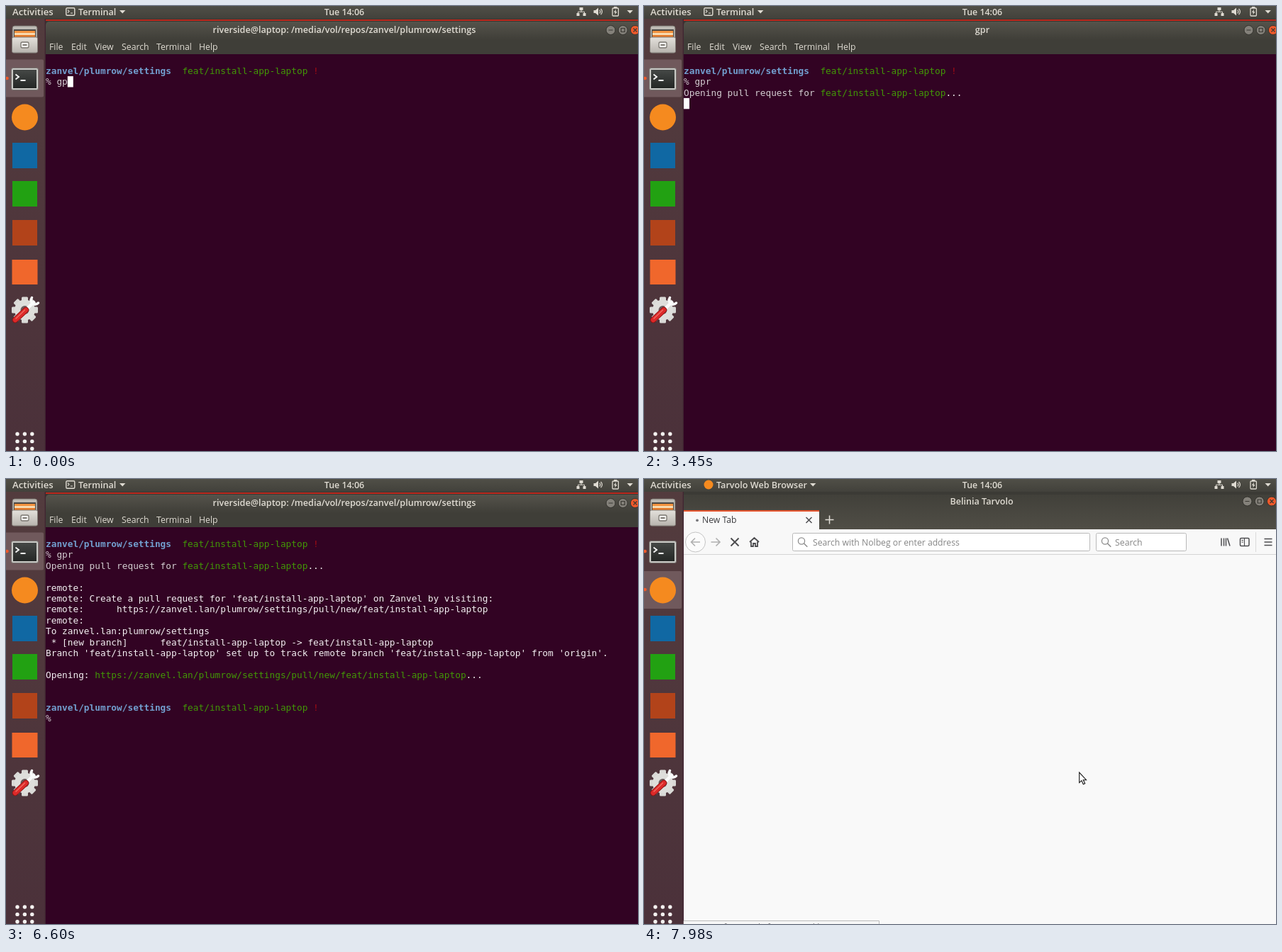
Recreate the animation shown at these times as an HTML page with a canvas. Size 891 by 628 pixels, loop 8 s.

```html
<!DOCTYPE html>
<html lang="en">
<head>
<meta charset="utf-8">
<title>Pull request from the shell</title>
<style>
html, body { margin: 0; width: 100%; height: 100%; overflow: hidden; background: #320323; }
canvas { display: block; }
</style>
</head>
<body>
<canvas id="stage" width="891" height="628"></canvas>
<script>
const c = document.getElementById('stage').getContext('2d');
const LOOP = 8000;
const UI = '"Open Sans", "Noto Sans", sans-serif';
const MONO = '"DejaVu Sans Mono", monospace';
const CELL_W = 7.696, CELL_H = 15.4, TERM_X = 56, TERM_Y = 83.7;
const GREY = '#d3cdd1', WHITE = '#f3f0f2', GREEN = '#429806', BLUE = '#729fcf', RED = '#a30c14';
const ORANGE = '#f0592a', PANEL_TEXT = '#dfdbd2';

const REPO = 'zanvel/plumrow/settings';
const BRANCH = 'feat/install-app-laptop';
const URL_TEXT = `https://zanvel.lan/plumrow/settings/pull/new/${BRANCH}`;
const SHELL_TITLE = `riverside@laptop: /media/vol/repos/${REPO}`;
const BROWSER = 'Tarvolo';

// Drawing helpers
function rect(x, y, w, h, fill) {
  c.fillStyle = fill;
  c.fillRect(x, y, w, h);
}
function box(x, y, w, h, r, fill, stroke, width = 1) {
  c.beginPath();
  c.roundRect(x, y, w, h, r);
  paint(fill, stroke, width);
}
function circle(x, y, r, fill, stroke, width = 1) {
  c.beginPath();
  c.arc(x, y, r, 0, 7);
  paint(fill, stroke, width);
}
function path(d, fill, stroke, width = 1) {
  const p = new Path2D(d);
  if (fill) { c.fillStyle = fill; c.fill(p); }
  if (stroke) { c.strokeStyle = stroke; c.lineWidth = width; c.stroke(p); }
}
function paint(fill, stroke, width) {
  if (fill) { c.fillStyle = fill; c.fill(); }
  if (stroke) { c.strokeStyle = stroke; c.lineWidth = width; c.stroke(); }
}
function text(str, x, y, color, weight = 400, size = 12.3, align = 'left') {
  c.font = `${weight} ${size}px ${UI}`;
  c.textAlign = align;
  c.fillStyle = color;
  c.fillText(str, x, y);
}
function fade(y0, y1, from, to) {
  const g = c.createLinearGradient(0, y0, 0, y1);
  g.addColorStop(0, from);
  g.addColorStop(1, to);
  return g;
}
function at(x, y, draw) {
  c.save();
  c.translate(x, y);
  draw();
  c.restore();
}

// Terminal text sits on a fixed character grid
function mono(row, col, str, color = WHITE, weight = 400) {
  c.font = `${weight} 12.78px ${MONO}`;
  c.textAlign = 'left';
  c.fillStyle = color;
  [...str].forEach((ch, i) => {
    if (ch !== ' ') c.fillText(ch, TERM_X + (col + i) * CELL_W, 96 + row * CELL_H);
  });
}
function cursor(row, col, hollow) {
  const x = TERM_X + col * CELL_W, y = TERM_Y + row * CELL_H;
  if (hollow) box(Math.round(x) + .5, Math.round(y) - .5, 8, 16, 0, null, '#fff', 1.2);
  else rect(x, y, 8, CELL_H, '#fff');
}
function prompt(row, typed) {
  mono(row, 0, REPO, BLUE, 700);
  mono(row, 25, BRANCH, GREEN);
  mono(row, 49, '!', RED);
  mono(row + 1, 0, '% ' + typed, GREY);
}

function windowButtons(x, y, focused) {
  [0, 17.2, 34.4].forEach((dx, i) => {
    const close = i === 2 && focused;
    circle(x + dx, y, 6.5, close ? ORANGE : focused ? '#84817a' : '#65625a', '#34332e');
  });
  const ink = focused ? '#3a3832' : '#5a5750';
  path(`M${x - 3} ${y}h6M${x + 14.7} ${y - 2.5}h5v5h-5zM${x + 32} ${y - 2.5}l5 5m0-5l-5 5`, null, ink, 1.2);
}

function topPanel(browserActive) {
  rect(0, 0, 891, 18, fade(0, 18, '#504f47', '#42413b'));
  text('Activities', 9, 12.5, PANEL_TEXT, 600, 13.2);
  if (browserActive) circle(91, 8, 6.5, '#f58a1f');
  else {
    box(84.8, 2.8, 12, 10.4, 1.5, null, PANEL_TEXT, 1.4);
    path('M87 5.5l2 2l-2 2M91 10h3', null, PANEL_TEXT, 1.1);
  }
  text(browserActive ? BROWSER + ' Web Browser' : 'Terminal', 102, 12.5, PANEL_TEXT, 600, 12.6);
  path(`M${browserActive ? 234 : 160} 6h8.4l-4.2 4.6z`, PANEL_TEXT);
  text('Tue 14:06', 477, 12.5, PANEL_TEXT, 600, 12.4, 'center');
  path('M808.5 2h5v4h-5zM804.5 10h4v4h-4zM813.5 10h4v4h-4z', PANEL_TEXT);
  path('M811 6v2.3M806.5 10v-1.8h9v1.8', null, PANEL_TEXT);
  path('M828.5 6h2.5l4-3.5v11l-4-3.5h-2.5z', PANEL_TEXT);
  path('M836.8 5.5q2 2.5 0 5M838.6 3.8q3.6 4.2 0 8.4', null, PANEL_TEXT, 1.2);
  box(855, 3, 8.4, 11, 1, null, PANEL_TEXT, 1.3);
  rect(857, 1, 4.4, 2, PANEL_TEXT);
  path('M860 4.5l-3.2 4.5h2l-.5 3.5l3.2-4.6h-2z', PANEL_TEXT);
  path('M875.5 6h8.4l-4.2 4.6z', PANEL_TEXT);
}

function filesIcon() {
  box(9, 28, 35, 38, 3, '#bdbab4', '#6d6862');
  rect(11, 33, 31, 13, '#4b4743');
  rect(12, 35, 29, 4, '#f2913d');
  rect(12, 38, 29, 3, '#f8d9ae');
  rect(12, 41, 29, 4, '#e47827');
  box(8.5, 44, 36, 22, 2, fade(44, 66, '#e4e1dc', '#b8b4ae'), '#837e78');
  box(21, 51, 11, 8, 2, '#f4f2ef', '#7b7771', 1.3);
  rect(23.5, 54, 6, 2, '#7b7771');
}
function terminalIcon() {
  box(7.5, 87.5, 38, 31, 2.5, '#c9c9c5', '#77736f');
  rect(10, 90, 33, 26, fade(90, 116, '#454846', '#242725'));
  path('M13.5 96.5l4.5 3.5l-4.5 3.5M20.5 105h7', null, '#fff', 1.8);
}
function settingsIcon() {
  at(26.5, 429, () => {
    for (let i = 0; i < 8; i++) {
      c.rotate(Math.PI / 4);
      box(-4.5, -18.5, 9, 10, 1.5, '#d9d9d6');
    }
    circle(0, 0, 14.5, '#dededb');
    circle(0, 0, 6, '#6c5a5b');
  });
  c.lineCap = 'round';
  path('M30 427L39 418', null, '#fafafa', 4.5);
  path('M36.5 411.5q-3 5 1 8.5q4 3 8-1', null, '#fafafa', 3.5);
  path('M13 443L28 429', null, '#8f1010', 8.5);
  path('M13 443L28 429', null, '#dc2a2a', 6.5);
  path('M14 441L26.5 429', null, '#f06a60', 1.5);
  c.lineCap = 'butt';
}
function dock(browserActive) {
  rect(0, 18, 55.5, 610, fade(18, 628, '#533c3e', '#4b313a'));
  rect(54.5, 18, 1, 610, '#432c34');
  box(-3, browserActive ? 130 : 75.5, 56, 53, 2, '#70595c');
  circle(1.5, 102, 2.3, ORANGE);
  if (browserActive) circle(1.5, 156, 2.3, ORANGE);
  filesIcon();
  terminalIcon();
  circle(26.5, 157, 18.5, '#f58a1f');
  rect(9, 193, 35, 36, '#1068a3');
  rect(9, 247, 35, 36, '#22a112');
  rect(9, 302, 35, 36, '#b2431a');
  rect(8.5, 358, 36, 35, '#f0672c');
  settingsIcon();
  for (let i = 0; i < 9; i++) circle(16 + i % 3 * 10.4, 604 + (i / 3 | 0) * 10.4, 2.7, '#f5f3f1');
}

function terminal(t) {
  const focused = t < 7350;
  const running = t >= 1200 && t < 6450;
  rect(56, 18, 835, 610, '#320323');
  rect(56, 18, 835, 8, '#383731');
  rect(56, 19, 835, 2, '#bd281d');
  box(56, 22, 845, 46, [5, 0, 0, 0], focused ? fade(22, 48, '#55534b', '#3f3e38') : '#3d3c37');
  text(running ? 'gpr' : SHELL_TITLE, 477, 38.3, focused ? PANEL_TEXT : '#88857d', 600, 12.6, 'center');
  windowButtons(852.5, 34, focused);
  [['File', 61], ['Edit', 92], ['View', 125], ['Search', 163], ['Terminal', 212], ['Help', 272]]
    .forEach(([name, x]) => text(name, x, 62.3, focused ? PANEL_TEXT : '#c9c5bc'));

  prompt(0, t < 450 ? 'gp' : 'gpr');
  if (t < 1200) {
    cursor(1, t < 450 ? 4 : 5);
    return;
  }
  mono(2, 0, 'Opening pull request for', GREY);
  mono(2, 25, BRANCH, GREEN);
  mono(2, 48, '...');
  if (running) {
    if (t < 1650 || Math.floor((t - 1650) / 600) % 2) cursor(3, 0);
    return;
  }
  [
    'remote:',
    `remote: Create a pull request for '${BRANCH}' on Zanvel by visiting:`,
    `remote:      ${URL_TEXT}`,
    'remote:',
    'To zanvel.lan:plumrow/settings',
    ` * [new branch]      ${BRANCH} -> ${BRANCH}`,
    `Branch '${BRANCH}' set up to track remote branch '${BRANCH}' from 'origin'.`
  ].forEach((line, i) => mono(4 + i, 0, line));
  mono(12, 0, 'Opening:');
  mono(12, 9, URL_TEXT, GREEN);
  mono(12, 77, '...');
  if (t < 6600) {
    cursor(14, 0);
    return;
  }
  prompt(15, '');
  if (t >= 7050) cursor(16, 2, !focused);
}

function magnifier(x) {
  circle(x, 87.5, 4.6, null, '#8d8d8d', 1.3);
  path(`M${x + 3.3} 90.8l5 5`, null, '#8d8d8d', 1.5);
}

function browser(t) {
  const loading = t >= 7680;
  const ink = '#4c4c4f';
  rect(56, 18, 835, 53, fade(18, 71, '#403f39', '#504e46'));
  rect(56, 18, 835, 4, '#3b3a35');
  text(`Belinia ${BROWSER}`, 476, 35.8, PANEL_TEXT, 600, 12.6, 'center');
  windowButtons(850.5, 31.5, true);
  rect(56, 44, 191, 27, '#f8f8f8');
  rect(56, 44, 191, 2, '#e8562f');
  text('New Tab', 82, 62.3, '#3b3b3e', 400, 12.2);
  path('M228.5 54l8 8m0-8l-8 8', null, ink, 1.5);
  path('M255.5 57.5h12m-6-6v12', null, '#e2dfd7', 1.5);

  rect(56, 71, 835, 36, '#f8f8f8');
  rect(56, 106, 835, 1, '#d4d4d4');
  rect(56, 107, 835, 521, '#f9f9f9');
  circle(72.5, 89, 14, '#fbfbfb', loading ? '#c4c4c4' : '#dedede');
  path('M79 89h-12.5m5.5-5.5l-5.5 5.5l5.5 5.5M94.5 89h12.5m-5.5-5.5l5.5 5.5l-5.5 5.5', null, '#b0b0b0', 1.6);
  path('M122.5 83.5l11 11m0-11l-11 11', null, ink, 1.9);
  path('M149 89l6.5-6l6.5 6M151 88.5v6.5h3v-4h3v4h3v-6.5', null, ink, 1.8);
  box(209.5, 76.5, 419, 25, 2, '#fff', '#b9b9b9');
  box(637.5, 76.5, 127, 25, 2, '#fff', '#b9b9b9');
  magnifier(222);
  magnifier(650);
  text('Search with Nolbeg or enter address', 238, 94, '#858585', 400, 12.2);
  text('Search', 664, 94, '#858585');
  path('M814 83.5v11M817.5 83.5v11M820.5 83.5v11M822.5 83.5l3.5 11', null, ink, 1.5);
  box(840.5, 83.5, 12.5, 11, 1.5, null, ink, 1.5);
  path('M846.5 83.5v11M842.5 86.5h2.5m-2.5 2.5h2.5', null, ink, 1.1);
  rect(862, 75, 1, 28, '#dadada');
  path('M874.5 84.5h11m-11 4.5h11m-11 4.5h11', null, ink, 1.6);

  if (loading) {
    circle(t >= 7830 && t < 7980 ? 70.5 : 75, 58.3, 1.9, '#77777a');
    box(54.5, 623.5, 277, 10, 0, '#f6f6f6', '#bcbcbc');
    text(t < 7980 ? 'Looking up zanvel.lan…' : 'Waiting for a reply from zanvel.lan…',
      66, 636.5, '#77777a');
  }
}

function pointer() {
  path('M613.7 414.2v14.4l3.2-3l2.4 5.2l2.4-1.1l-2.4-5h4.2z', '#fff', '#111', 1.1);
}

function draw(t) {
  const browserActive = t >= 7350;
  c.clearRect(0, 0, 891, 628);
  if (t < 7500) terminal(t);
  else browser(t);
  topPanel(browserActive);
  dock(browserActive);
  if (t >= 7050) pointer();
}

const start = performance.now();
function tick() {
  draw((performance.now() - start) % LOOP);
  requestAnimationFrame(tick);
}
tick();
</script>
</body>
</html>
```
